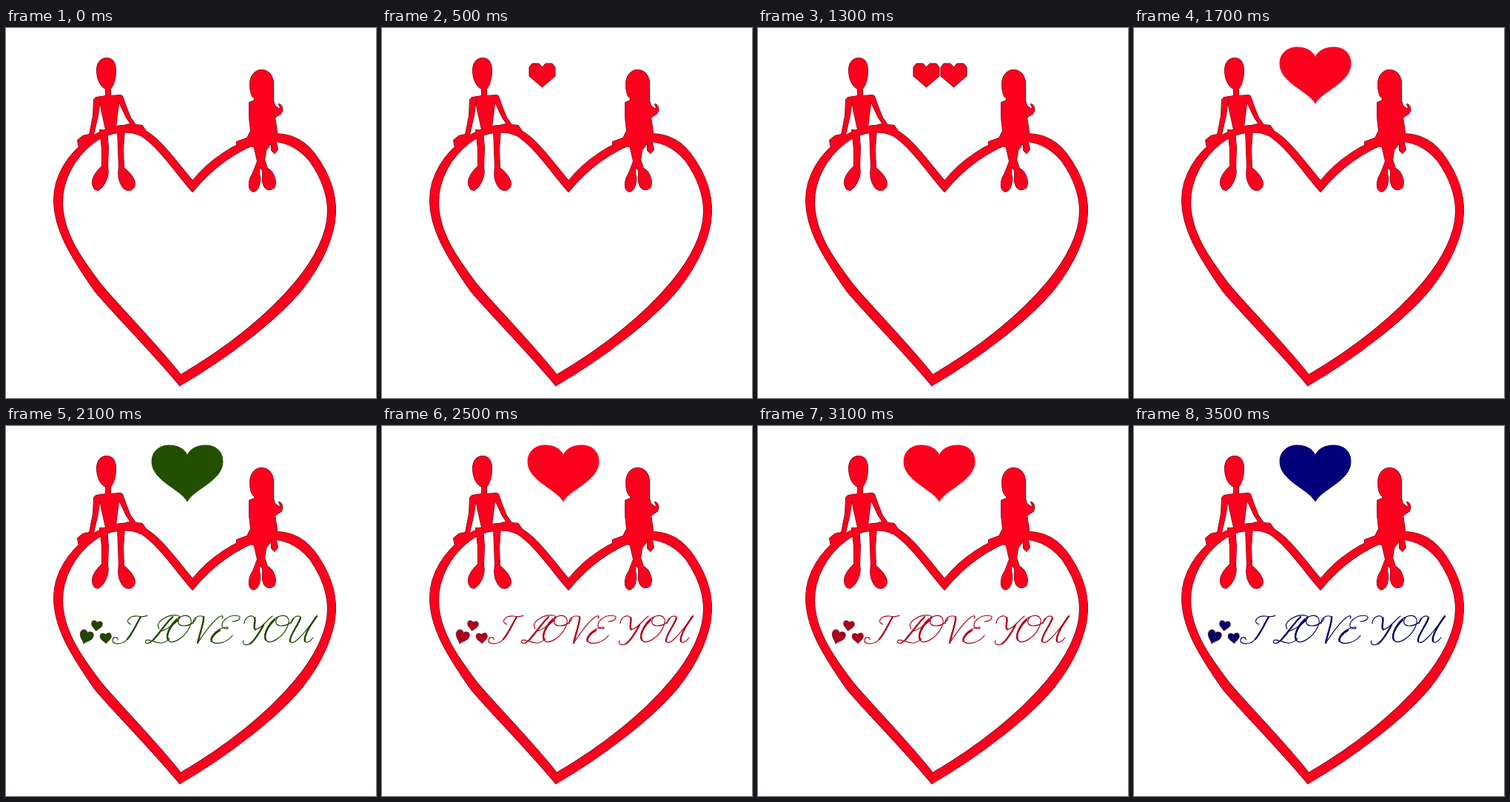
An HTML page for the animation above (3700 ms loop, 500 by 500 pixels).

```html
<!DOCTYPE html>
<html lang="en">
<head>
<meta charset="utf-8">
<title>I love you</title>
<style>
html, body { margin: 0; width: 100%; height: 100%; overflow: hidden; background: #fff; }
svg { display: block; width: 500px; height: 500px; }
.hair, .thick { fill: none; stroke: currentColor; stroke-linecap: round; stroke-linejoin: round; }
.hair { stroke-width: 1.2; }
.thick { stroke-width: 2.4; }
</style>
</head>
<body>
<svg viewBox="0 0 500 500" fill="#fd001d" stroke-linejoin="round">
  <defs>
    <path id="love" d="M0 76C-9 59-48 48-48 22C-48 8-37 0-25 0C-13 0-3 5 0 14C3 5 13 0 25 0C38 0 48 8 48 22C48 48 9 59 0 76Z"/>
    <path id="puff" d="M4 0H13L17.5 5L22 0H31L35 5V17L17.5 32L0 17V5Z"/>
    <g id="o">
      <path class="hair" d="M238 257C226 260 214 280 219 289C223 297 241 287 248 272C254 260 247 254 238 257C231 260 230 270 240 270C249 270 255 265 257 260"/>
      <path class="thick" d="M231 262C221 271 216 283 219 289"/>
    </g>
    <g id="scene">
      <!-- large outline -->
      <path fill-rule="evenodd" d="M252 207C228 178 207 147 182 136C160 129 140 130 112 150C84 170 65 200 65 232C65 270 85 305 120 355C145 385 195 435 235 483C300 445 365 395 400 353C428 318 444 280 445 250C446 222 437 197 417 170C400 148 375 138 345 146C310 155 275 178 252 207Z
        M252 221C227 192 204 158 182 145C165 138 140 138 118 155C92 175 76 205 76 235C76 275 100 310 130 349C156 380 204 428 236 469C300 432 355 387 390 345C418 312 435 277 435 248C435 227 427 203 411 180C395 160 372 149 345 154C311 165 278 189 252 221Z"/>
      <!-- man -->
      <path d="M136 41C144 41 148 48 148 57C148 67 146 76 141 82L141 92L155 91L157 95L152 102L148 134L135 137L129 110L127 96L124 118L118 144L119 149L108 157L99 162L97 152L104 146L113 144L118 119L119 97L122 94L135 92L135 82C127 78 123 68 123 57C123 48 128 41 136 41Z
        M152 92L157 92L162 106L168 121L175 131L184 132L188 138L180 142L165 137L162 131L169 130L163 121L154 102Z
        M127 138L136 139L138 162L137 188C140 201 132 215 124 219C117 218 115 208 119 201C122 194 127 190 130 187L130 163Z
        M151 136L160 137L158 164L159 189C164 194 174 202 174 211C173 219 165 221 160 217C153 210 151 200 153 188L152 163Z"/>
      <!-- woman -->
      <path d="M345 57C354 57 361 64 361 76L361 98L363 105L368 109C372 110 371 106 369 103C375 106 375 115 367 118L363 121L366 140L364 151L367 164L363 169L359 165L359 153L357 147L358 156L350 166L334 160L323 158L312 160L312 154L326 149L331 139L329 121L329 101L336 98L336 95C331 92 330 84 330 76C330 65 337 57 345 57Z
        M335 158L352 160L349 178L353 190C361 194 367 207 362 216C355 221 348 217 347 207L347 193L343 186L342 196C345 207 342 219 334 221C326 218 328 205 334 196L340 180Z"/>
    </g>
  </defs>

  <use href="#scene" stroke="#700010" stroke-width="2"/>
  <use href="#scene" stroke="#fd001d" stroke-width=".8"/>

  <g id="puffs" stroke="#800012">
    <use href="#puff"/><use href="#puff"/>
  </g>

  <use id="big" href="#love" x="245" y="26" fill="currentColor" stroke="currentColor"/>

  <g id="words" role="img" aria-label="I LOVE YOU">
    <g fill="currentColor" stroke="#4008" stroke-width="6">
      <use href="#love" transform="translate(111 277) rotate(20) scale(.19 .24)"/>
      <use href="#love" transform="translate(123.5 263.5) rotate(8) scale(.155 .18)"/>
      <use href="#love" transform="translate(134.5 280) rotate(-3) scale(.16 .185)"/>
    </g>
    <path class="hair" d="M169 268C160 266 165 256 178 257C184 258 188 258 191 256M164 288C158 296 143 296 144 289C145 284 152 285 151 289
      M207 274C200 264 220 254 232 256C241 259 224 271 211 277M199 289C193 296 186 294 189 290C193 286 203 295 211 293C216 292 219 290 221 287
      M253 267C252 258 262 255 267 258M259 293C268 280 280 262 290 257C293 256 294 258 292 260
      M306 264C314 265 322 256 310 256C295 257 285 271 297 274C301 274 301 271 297 272C284 274 274 286 278 291C284 297 300 292 306 283
      M322 267C322 258 332 254 336 259M337 275C346 274 352 262 360 257M330 294C326 297 318 296 321 290
      M385 267C386 258 396 254 398 259M384 291C388 298 402 282 420 257M404 291C406 295 412 290 415 286"/>
    <path class="thick" d="M182 258C176 268 171 280 164 288M225 258C215 268 208 279 199 289M267 258C268 264 262 280 259 293M289 276C281 281 276 287 278 291
      M336 259C338 265 333 272 337 275M348 269C342 280 336 290 330 294M398 259C396 268 382 284 384 291M420 257C412 268 402 284 404 291"/>
    <use href="#o"/>
    <use href="#o" x="132"/>
  </g>
</svg>
<script>
const LOOP = 3700, BEAT = 200, LEAD = 100;
const $ = id => document.getElementById(id);
const [left, right] = $('puffs').children;
const big = $('big'), words = $('words');

// x, y and scale of each floating heart, by beat
const rise = [[161, 97, .55], [176, 76, .76], [199, 48, 1]];
const leftPath = [null, ...rise, rise[2], rise[2], rise[2], [210, 48, 1], [228.5, 48, 1]];
const rightPath = [null, null, null, null, [309, 97, .55], [282, 73, .76], [247, 48, 1], [247, 48, 1]];

const heartColors = ['#fd001d', '#234f00', '#04007a'];
const wordColors = ['#b0001c', '#1f4700', '#08006a'];

const show = (el, on) => el.style.display = on ? '' : 'none';

function place(el, spot) {
  show(el, spot);
  if (spot) el.setAttribute('transform', `translate(${spot[0]} ${spot[1]}) scale(${spot[2]})`);
}

function draw(now) {
  const t = now % LOOP;
  const beat = t < LEAD ? 0 : 1 + Math.floor((t - LEAD) / BEAT);
  const hue = Math.max(0, beat - 10) % 3;
  place(left, leftPath[beat]);
  place(right, rightPath[beat]);
  show(big, beat >= 9);
  show(words, beat >= 10);
  big.style.color = heartColors[hue];
  words.style.color = wordColors[hue];
}

const start = performance.now();
function tick() {
  draw(performance.now() - start);
  requestAnimationFrame(tick);
}
tick();
</script>
</body>
</html>
```
